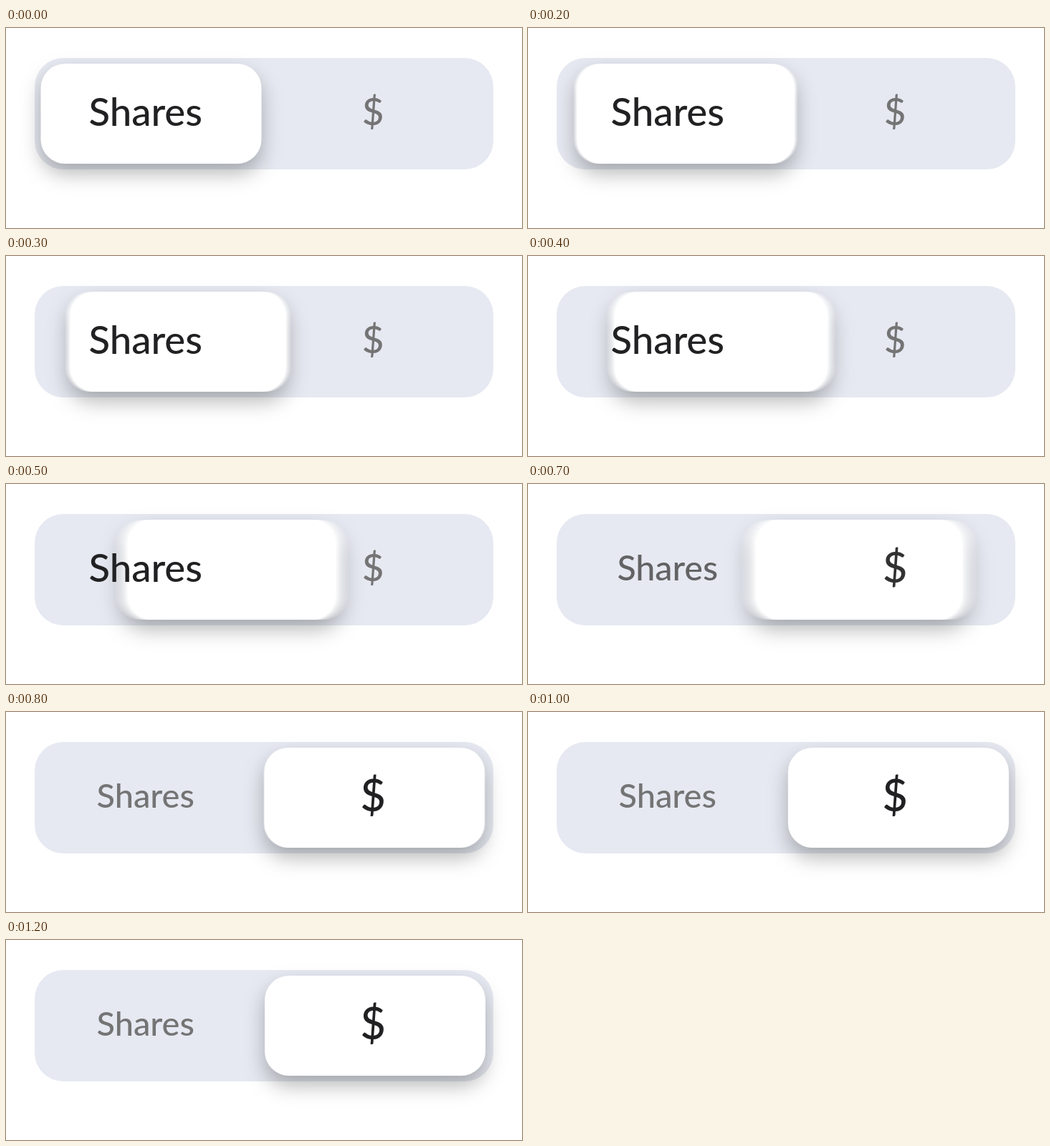
Write an HTML page with a canvas that moves like this. It is 720 px wide and 280 px high and loops after 3.3 s.

```html
<!DOCTYPE html>
<html lang="en">
<head>
<meta charset="utf-8">
<title>Shares / $ toggle</title>
<style>
  html, body { margin: 0; width: 100%; height: 100%; overflow: hidden; background: #fff; }
  canvas { display: block; }
</style>
</head>
<body>
<canvas id="stage" width="720" height="280"></canvas>
<script>
const LOOP = 3300, STEP = 100;
const TRACK = { x: 40, y: 42, w: 640, h: 156, r: 40 };
const KNOB = { x: 48.5, y: 50, w: 308, h: 140, r: 34 };
const TRAVEL = 312.5;
const SHUTTER = 0.4;
const SAMPLES = 17; // divides 255, so the overlaid copies add up to opaque
const DARK = [33, 33, 35], GREY = [116, 116, 117];
const SMALL = 0.86;

// Share of the travel at each step: acceleration, small overshoot, settling
const PATH = [0, 0.013, 0.056, 0.12, 0.214, 0.36, 0.555, 0.83, 0.997, 1.012, 1.006, 1.002, 1];
const LAST = PATH.length - 1;

const canvas = document.getElementById("stage");
const ctx = canvas.getContext("2d");
const layer = document.createElement("canvas");
layer.width = canvas.width;
layer.height = canvas.height;
const lctx = layer.getContext("2d");

const mix = (a, b, p) => a + (b - a) * p;
const mixColor = (a, b, p) => `rgb(${a.map((v, i) => Math.round(mix(v, b[i], p))).join(",")})`;
const at = i => PATH[Math.max(0, Math.min(LAST, i))];

function fillRound(c, x, { y, w, h, r }) {
  c.beginPath();
  c.roundRect(x, y, w, h, r);
  c.fill();
}

function drawKnob(step) {
  const x = KNOB.x + TRAVEL * at(step);
  const speed = Math.min(Math.abs(at(step) - at(step - 1)), Math.abs(at(step + 1) - at(step)));
  const smear = speed * TRAVEL * SHUTTER;

  lctx.clearRect(0, 0, layer.width, layer.height);
  lctx.globalCompositeOperation = "lighter";
  lctx.fillStyle = "#fff";
  const copies = smear < 0.3 ? 1 : SAMPLES;
  lctx.globalAlpha = 1 / copies;
  for (let i = 0; i < copies; i++) {
    const offset = copies > 1 ? (i / (copies - 1) - 0.5) * smear : 0;
    fillRound(lctx, x + offset, KNOB);
  }

  ctx.save();
  ctx.shadowColor = "rgba(0,0,0,0.28)";
  ctx.shadowBlur = 28;
  ctx.shadowOffsetY = 14;
  ctx.drawImage(layer, 0, 0);
  ctx.restore();
}

// active: 1 is large and dark, 0 is small and grey
function drawLabel(text, size, x, y, baseline, active) {
  const scale = mix(SMALL, 1, active);
  ctx.save();
  ctx.translate(x, y);
  ctx.scale(scale, scale);
  ctx.font = `500 ${size}px Lato, sans-serif`;
  ctx.textAlign = "center";
  ctx.fillStyle = mixColor(GREY, DARK, active);
  ctx.fillText(text, 0, baseline);
  ctx.restore();
}

function draw(time) {
  const step = Math.min(LAST, Math.floor((time % LOOP) / STEP));
  const swap = Math.max(0, Math.min(1, (step - 5) * 0.4));

  ctx.fillStyle = "#fff";
  ctx.fillRect(0, 0, canvas.width, canvas.height);
  ctx.fillStyle = "#e6e9f1";
  fillRound(ctx, TRACK.x, TRACK);
  drawKnob(step);
  drawLabel("Shares", 54.5, 194.7, 118, 19, 1 - swap);
  drawLabel("$", 61.5, 512, 117, 22, swap);
}

const start = performance.now();
function tick() {
  draw(performance.now() - start);
  requestAnimationFrame(tick);
}
tick();
</script>
</body>
</html>
```
